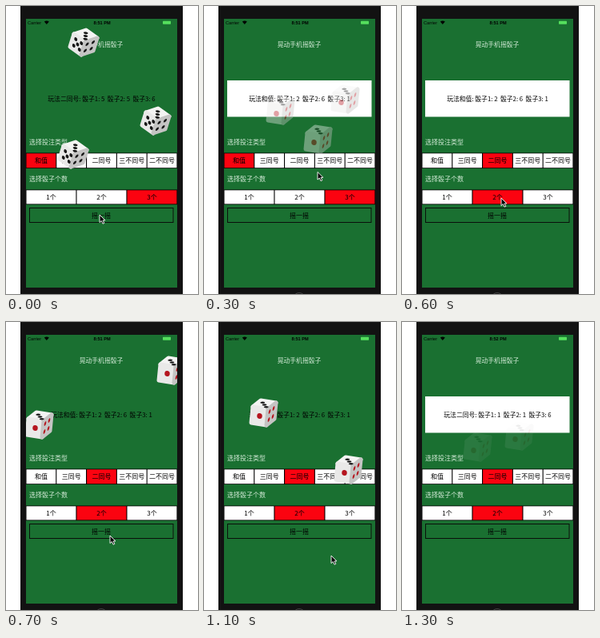
Write an HTML page that moves like this. It is 240x360 px and loops after 1400 ms.

```html
<!DOCTYPE html>
<html lang="zh-CN">
<head>
<meta charset="utf-8">
<title>摇骰子</title>
<style>
html, body { margin: 0; width: 100%; height: 100%; overflow: hidden; background: #fff; }
svg { display: block; width: 240px; height: 360px; }
text { font-family: "Noto Sans CJK SC", "Noto Sans CJK", "Open Sans", sans-serif; font-size: 8px; white-space: pre; }
.mid { text-anchor: middle; }
.pale { fill: #d5ecd9; }
.small { font-size: 7.8px; }
.status { font-family: "Liberation Sans", Arial, sans-serif; font-size: 5.6px; }
</style>
</head>
<body>
<svg viewBox="0 0 240 360">
  <defs><clipPath id="screen"><rect x="25" y="16" width="189" height="336"/></clipPath></defs>
  <rect x="18" width="203" height="360" fill="#121212"/>
  <rect x="25" y="16" width="189" height="336" fill="#1a7031"/>
  <circle id="home" cx="119" cy="366" r="7.5" fill="none" stroke="#444"/>
  <text class="status" x="27" y="22.6">Carrier</text>
  <path d="M47.8 19.6Q50.8 17.2 53.8 19.6L50.8 23z"/>
  <text class="status mid" id="clock" x="120" y="22.7" font-weight="700"></text>
  <rect x="196" y="18.7" width="10" height="4" rx=".6" fill="#55df5d"/>
  <text class="mid pale small" x="119" y="51">晃动手机摇骰子</text>
  <rect id="box" x="29" y="93" width="180.5" height="45.5" fill="#fff"/>
  <text class="mid small" id="result" x="119.5" y="118.6"></text>
  <text class="pale" x="29" y="173.3">选择投注类型</text>
  <g id="types"></g>
  <text class="pale" x="29" y="219">选择骰子个数</text>
  <g id="counts"></g>
  <rect x="29.5" y="252.5" width="179.5" height="18" fill="none" stroke="#0a0f0b"/>
  <text class="mid" x="119" y="264.6">摇一摇</text>
  <g id="dice" clip-path="url(#screen)"></g>
  <path id="arrow" d="M0 0V9.6L2.3 7.5L4 11.2L5.8 10.4L4.1 6.9H7z" fill="#050505" stroke="#fff" stroke-width=".9" stroke-linejoin="round"/>
</svg>
<script>
const byId = id => document.getElementById(id);

function add(parent, tag, attrs) {
  const el = document.createElementNS("http://www.w3.org/2000/svg", tag);
  for (const k in attrs) el.setAttribute(k, attrs[k]);
  parent.appendChild(el);
  return el;
}

function buttonRow(id, labels, y, h) {
  const w = 189 / labels.length, row = byId(id);
  add(row, "rect", { x: 25, y, width: 189, height: h });
  return labels.map((label, i) => {
    const x = 25 + i * w;
    const cell = add(row, "rect", { x: x + .5, y: y + .8, width: w - 1.1, height: h - 1.6 });
    add(row, "text", { x: x + w / 2, y: y + h / 2 + 3, class: "mid" }).textContent = label;
    return cell;
  });
}

function pips(n) {
  const a = .25, b = .75, list = n % 2 ? [[.5, .5]] : [];
  if (n > 1) list.push([a, a], [b, b]);
  if (n > 3) list.push([a, b], [b, a]);
  return list;
}

// Each cube: nearest corner, its edges to the left, right and down, then pips and inks per face
const black = "#181818", red = "#b5151f";
const CUBES = [
  { near: [2, -2], left: [-14, -10], right: [15, -5], down: [-5, 16], pips: [3, 5, 4], inks: [black, black, black] },
  { near: [5, -5], left: [-19, -3], right: [10, -8], down: [-2, 20], pips: [3, 1, 4], inks: [black, red, red] }
];
const SHADES = ["#f4f4f3", "#e9e9e8", "#c4c4c3"];

function drawCube(parent, { near, left, right, down, pips: counts, inks }) {
  const g = add(parent, "g", {});
  const faces = [[left, right], [left, down], [right, down]].map(e => `matrix(${[...e.flat(), ...near]})`);
  faces.forEach((transform, i) => add(g, "path", {
    d: "M0 0H1V1H0z", transform, fill: SHADES[i], stroke: SHADES[i],
    "stroke-width": 5, "stroke-linejoin": "round", "vector-effect": "non-scaling-stroke"
  }));
  faces.forEach((transform, i) => pips(counts[i]).forEach(([cx, cy]) =>
    add(g, "circle", { cx, cy, transform, r: counts[i] === 1 ? .17 : .13, fill: inks[i] })));
  return g;
}

const types = buttonRow("types", ["和值", "三同号", "二同号", "三不同号", "二不同号"], 183.5, 19.5);
const counts = buttonRow("counts", ["1个", "2个", "3个"], 229.5, 18.7);

const STEP = 100, STEPS = 14;

// Tracks: step, x, y
const POINTER = [[0, 117, 261], [2, 160, 221], [4, 124, 194], [5, 147, 231], [6, 124, 240], [7, 130, 267], [9, 159, 287], [11, 159, 292]];
const ROLLS = [
  [[0, 97, 47], [2, 96, 131]],
  [[0, 187, 145], [2, 177, 117]],
  [[0, 84, 187], [2, 143, 167]],
  [[7, 207, 61], [9, 137, 178], [11, 75, 114], [12, 95, 157]],
  [[7, 42, 129], [9, 137, 178], [11, 181, 185], [12, 147, 143]]
];
const dice = ROLLS.map(track => {
  const el = add(byId("dice"), "g", {});
  return { el, track, looks: CUBES.map(c => drawCube(el, c)) };
});

function place(el, track, step) {
  const n = track.findIndex(k => k[0] >= step);
  const to = n < 0 ? track[track.length - 1] : track[n], from = n > 0 ? track[n - 1] : to;
  const p = to === from ? 0 : (step - from[0]) / (to[0] - from[0]);
  const mix = k => from[k] + (to[k] - from[k]) * p;
  el.setAttribute("transform", `translate(${mix(1)} ${mix(2)})`);
}

const show = (el, on) => { el.style.display = on ? "" : "none"; };
const select = (cells, n) => cells.forEach((c, i) => c.setAttribute("fill", i === n ? "#fb0310" : "#fff"));
const resultText = (play, a, b, c) => `玩法${play}: 骰子1: ${a}  骰子2: ${b}  骰子3: ${c}`;

function draw(i) {
  const fade = i === 3 || i === 12 ? .4 : i === 4 || i === 13 ? .08 : 1;
  const rolling = i < 3 || (i > 6 && i < 12);
  const look = i < 2 || i === 8 || i === 9 ? 0 : 1;
  byId("clock").textContent = i < 13 ? "8:51 PM" : "8:52 PM";
  byId("result").textContent = i < 3 ? resultText("二同号", 5, 5, 6)
    : i < 12 ? resultText("和值", 2, 6, 1) : resultText("二同号", 1, 1, 6);
  select(types, i < 4 ? 0 : 2);
  select(counts, i < 6 ? 2 : 1);
  show(byId("box"), !rolling);
  show(byId("home"), i > 0);
  show(byId("arrow"), i < 13);
  place(byId("arrow"), POINTER, i);
  dice.forEach(({ el, track, looks }, n) => {
    show(el, n < 3 ? i < 5 : i > 6);
    place(el, track, i);
    el.setAttribute("opacity", fade);
    looks.forEach((g, k) => show(g, k === look));
  });
}

const start = performance.now();
let last = -1;
function tick() {
  const i = Math.floor((performance.now() - start) / STEP) % STEPS;
  if (i !== last) draw(last = i);
  requestAnimationFrame(tick);
}
tick();
</script>
</body>
</html>
```
